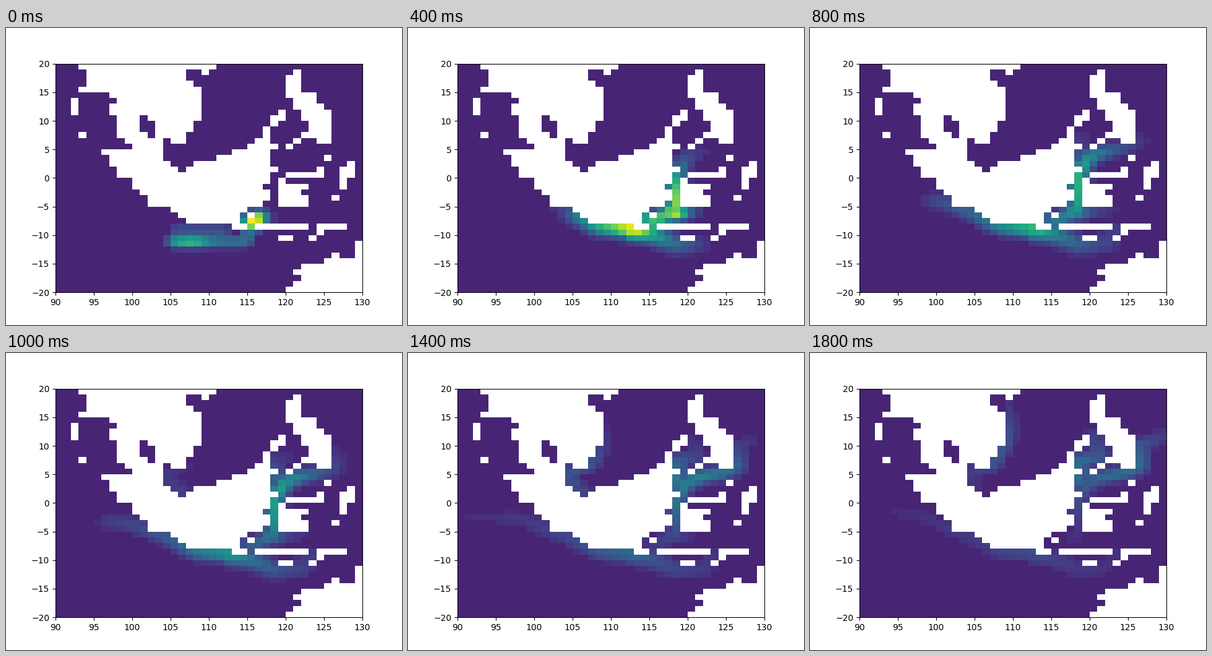
Animation, 640 px wide and 480 px high, one loop 2 s. Source, as a matplotlib script:

```python
import numpy as np
import matplotlib.pyplot as plt
from matplotlib.animation import FuncAnimation
from matplotlib.path import Path

WEST, EAST, SOUTH, NORTH = 90, 130, -20, 20
FRAMES, INTERVAL = 10, 200
BASE = 0.1    # colour level of undisturbed sea
FAINT = 0.03  # weaker tracer is not visible

lon, lat = np.meshgrid(np.arange(WEST, EAST) + 0.5,
                       np.arange(SOUTH, NORTH) + 0.5)
centres = np.column_stack([lon.ravel(), lat.ravel()])


# ---- land: a cell counts when its centre lies inside a coastline ----
def inside(*coast):
    return Path(coast).contains_points(centres).reshape(lon.shape)


def strip(x0, x1, y0, y1):
    return (lon > x0) & (lon < x1) & (lat > y0) & (lat < y1)


def islet(x, y):
    return strip(x, x + 1, y, y + 1)


west_coast = [
    (93.2, 20), (94, 18), (94, 16), (93, 16), (93, 15), (96.9, 15),
    (98, 13.5), (97, 12.3), (98, 10.5), (98, 7.6), (100, 5.5), (100, 5.2),
    (96, 5), (97.2, 3), (98.2, .5), (99.8, -.5), (100.3, -1.6),
    (102, -3.4), (102.2, -4.9), (105, -5.3), (107.2, -8)]
borneo_coast = [
    (113, -8), (113, -9), (115, -9), (115, -8), (114, -8), (114, -6.1),
    (115, -5.6), (117, -4.6), (118, -3.6), (118, -2), (117, -1.5),
    (118, -1), (118, .9), (119, 1.5), (118, 2.1), (118, 4.9), (119, 5.5),
    (118, 6.1), (118, 9), (117, 9), (117, 7.3), (115, 5.4), (108, 2.5),
    (107, 1.5), (106.5, 1)]
gulf_coast = [
    (106, 1.5), (104, 3.5), (104, 7), (105, 7), (105, 6), (107, 6),
    (107, 7.6), (108, 8.4), (108, 9.7), (109, 10.4), (109, 15.6),
    (107, 17.4), (107, 19), (111, 19), (111, 20)]
# The coast rises more gently towards the middle of northern Borneo
bight = borneo_coast.index((108, 2.5))
borneo_coast[bight:bight] = [(113, 4.5), (111, 3.5)]

gulf = inside((101, 11), (102, 11), (103, 9.9), (103, 7), (102, 7.1), (101, 8))
land = inside(*west_coast, *borneo_coast, *gulf_coast) & ~gulf
land |= inside(  # Philippines
    (121, 19), (122, 19), (122, 15), (124, 14.9), (124, 13.4), (126, 11.5),
    (126, 6), (124, 6), (124, 7), (122, 7), (122, 8), (123, 8), (123, 9.6),
    (122, 10.4), (122, 11.6), (121, 12.4), (121, 13.6), (120, 14.4),
    (120, 18), (121, 18))
land |= inside(  # Palawan
    (119.2, 12), (120, 12), (120, 10.6), (118.9, 9), (118, 9), (118, 11))
land |= inside(  # Sulawesi
    (120, 1), (125, 1), (125, 0), (120, 0), (120, -1), (123, -1),
    (122, -2.5), (123, -3.5), (123, -5), (119, -5), (119, 0), (120, 0))
land |= inside(  # Halmahera
    (128, 3), (129, 3), (129, 0), (128, 0), (128, -2), (127, -2), (127, 2),
    (128, 2))
land |= inside(  # Australia
    (129, -11), (129, -13.8), (125, -14.4), (122, -15.4), (121, -16.5),
    (122, -17.5), (120, -19.5), (120, -20), (130, -20), (130, -11))
land |= strip(116, 123, -9, -8) | strip(124, 128, -9, -8)
land |= strip(119, 121, -11, -10) | strip(92, 93, 11, 14)
for spot in [(109, 18), (93, 7), (121, 6), (120, 5), (125, 3), (124, 1),
             (126, -4), (115, -7), (124, -10), (123, -11), (126, -14)]:
    land |= islet(*spot)


# ---- tracer carried along currents ----
def trace(*points):
    """Evenly sampled route: x, y and distance travelled."""
    x, y = np.array(points, float).T
    dist = np.append(0, np.cumsum(np.hypot(np.diff(x), np.diff(y))))
    d = np.arange(0, dist[-1], 0.2)
    return np.interp(d, dist, x), np.interp(d, dist, y), d


def brush(route, strength, width):
    """Soft stroke along a route, strongest sample wins."""
    x, y, s = (np.reshape(a, (-1, 1, 1)) for a in (*route[:2], strength))
    gap = (lon - x) ** 2 + (lat - y) ** 2
    return (s * np.exp(-gap / (2 * width ** 2))).max(axis=0)


def outflow(d, peak, reach, front):
    """Fades away from its source, cut off by an advancing front."""
    return peak * np.exp(-d / reach) * np.clip((front - d) / 3, 0, 1)


def pulse(d, peak, centre, ahead, behind):
    """Travelling hump with different slopes before and after."""
    width = np.where(d > centre, ahead, behind)
    return peak * np.exp(-((d - centre) / width) ** 2 / 2)


patch = trace((105.5, -11.1), (114.8, -11.1), (115.3, -8.8))
fringe = trace((106, -9.2), (112, -9.2))
southeast = trace((113, -9.2), (115.3, -9.8), (118.5, -11.7), (122, -11.5),
                  (123.5, -9))
strait = trace((114.5, -6.5), (114.8, -7.5), (115.5, -8.3), (115.6, -7.5),
               (117.4, -6.3), (118.5, -5), (118.5, 1), (119.2, 2.3),
               (120, 3.7), (122, 4.6), (125.5, 5.6), (126.5, 6.5),
               (126.6, 10), (130, 12))
flores = trace((118.5, -6.2), (123.5, -5.5))
sulu = trace((118.6, 4), (118.8, 7.5), (121.3, 8), (120.5, 12))
china_sea = trace((106.5, 2), (104.6, 4), (105, 5.7), (107.4, 6.5),
                  (108.5, 9), (109.5, 12), (109.6, 18))


def tracer(t):
    # The western current bends north as time goes on
    westward = trace((113, -8.9), (108.5, -8.5), (104.5, -6), (101, -4.2),
                     (98, -4.8 + .3 * t), (88, -4.6 + .35 * t))
    coast = 2.1 * np.exp(-.3 * t) * (1 - np.exp(-t))
    start = np.exp(-2 * t)
    hump = (.95 * np.exp(-.145 * t), 3.5 + 2 * t,
            min(5.5, .6 + 2 * t), min(8, 1.8 + 3 * t))
    late = .17 * np.clip((t - 4) / 2, 0, 1)

    d = patch[2]
    layers = [
        brush(patch, start * (.3 + .35 * np.exp(-(d - 2) ** 2 / 6)), .7),
        brush(fringe, start * .18 * np.ones_like(fringe[2]), .7),
        brush(westward, outflow(westward[2], coast, 5 + t, 5 + 3 * t), 1),
        brush(southeast, outflow(southeast[2], .9 * coast, 3 + .8 * t,
                                 5 + 3 * t), 1.1),
        brush(strait, pulse(strait[2], *hump), .9),
        brush(sulu, pulse(sulu[2] + 20, *hump), .9),
        brush(flores, outflow(flores[2], 2 * np.exp(-.45 * t), 2.2,
                              1.8 * t), .85),
        brush(china_sea, pulse(china_sea[2], late, 2.5 * (t - 5), 5, 5), .8),
    ]
    level = np.max(layers, axis=0)
    return np.where(level < FAINT, 0, level)


def sea(step):
    return np.ma.masked_array(BASE + tracer(step), land)


# ---- figure ----
fig, ax = plt.subplots(figsize=(6.4, 4.8), dpi=100)
mesh = ax.pcolormesh(np.arange(WEST, EAST + 1), np.arange(SOUTH, NORTH + 1),
                     sea(0), cmap="viridis", vmin=0, vmax=1)


def update(step):
    mesh.set_array(sea(step))
    return [mesh]


anim = FuncAnimation(fig, update, frames=FRAMES, interval=INTERVAL,
                     repeat=True, repeat_delay=0)
plt.show()
```
